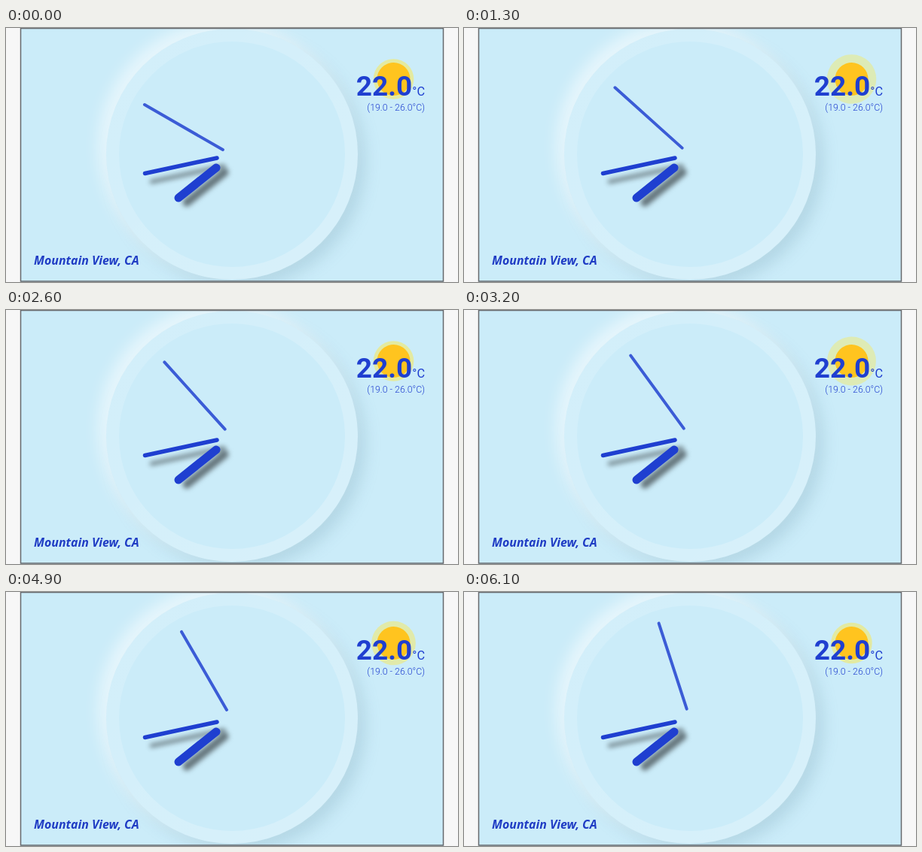
An HTML page for the animation above (6400 ms loop, 600 by 338 pixels).

```html
<!DOCTYPE html>
<html lang="en">
<head>
<meta charset="utf-8">
<title>Clock</title>
<style>
  html, body { margin: 0; width: 100%; height: 100%; overflow: hidden; background: #f7f7f7; }
  #face {
    position: absolute; left: 19px; top: 0; width: 562px; height: 338px;
    background: #cbecf9; overflow: hidden;
  }
  #relief {
    position: absolute; left: 114px; top: 1px; width: 334px; height: 334px; border-radius: 50%;
    box-shadow: -10px -10px 20px rgba(255, 255, 255, .55), 10px 10px 20px rgba(120, 160, 180, .28);
  }
  svg { position: absolute; left: 0; top: 0; }
  line { stroke: #1f3fd0; stroke-linecap: round; }
  text { fill: #1f3fd0; font-family: Roboto, sans-serif; }
  #place { fill: #1f3cc4; font: italic 600 15.9px 'Noto Sans', sans-serif; }
  #hour { filter: drop-shadow(11px 6.5px 3px rgba(0, 0, 0, .5)); }
  #minute { filter: drop-shadow(9px 11px 3px rgba(0, 0, 0, .42)); }
</style>
</head>
<body>
<div id="face"><div id="relief"></div></div>
<svg width="600" height="338" viewBox="0 0 600 338">
  <linearGradient id="sheen" x2="1" y2="1">
    <stop stop-color="#fff" stop-opacity=".13"/>
    <stop offset="1" stop-color="#fff" stop-opacity=".25"/>
  </linearGradient>
  <circle cx="300" cy="168" r="158.5" fill="none" stroke="url(#sheen)" stroke-width="17"/>
  <rect x="19.5" y=".5" width="561" height="336.5" fill="none" stroke="#66686c" stroke-width="1.5"/>

  <circle id="halo" cx="514.5" cy="68" fill="#ffe83b"/>
  <circle cx="514.5" cy="68" r="22" fill="#ffc41f"/>
  <text x="556" y="90" text-anchor="end" font-size="37" font-weight="700">22.0<tspan font-size="16.3" font-weight="400">°C</tspan></text>
  <text x="556" y="110" text-anchor="end" font-size="12.3" font-weight="300">(19.0 - 26.0°C)</text>
  <text id="place" x="37" y="315">Mountain View, CA</text>

  <line id="minute" x1="280" y1="173" x2="184.5" y2="193.5" stroke-width="5.5"/>
  <line id="hour" x1="279" y1="186" x2="229" y2="226" stroke-width="11"/>
  <line id="second" x1="300" y1="155" x2="300" y2="35" stroke-width="4" opacity=".83"/>
</svg>
<script>
  const LOOP = 6400, TICK = 950, PULSE = 2050, PEAK = 1300;
  const halo = document.getElementById('halo');
  const second = document.getElementById('second');

  function draw(t) {
    const seconds = 50 + Math.floor((t + 600) / TICK);
    second.setAttribute('transform', `rotate(${seconds * 6} 300 169)`);

    const pulse = Math.cos((t - PEAK) / PULSE * 2 * Math.PI);
    halo.setAttribute('r', 29.2 + 3.6 * pulse);
    halo.setAttribute('opacity', .42 - .07 * pulse);
  }

  function frame() {
    draw(performance.now() % LOOP);
    requestAnimationFrame(frame);
  }
  frame();
</script>
</body>
</html>
```
